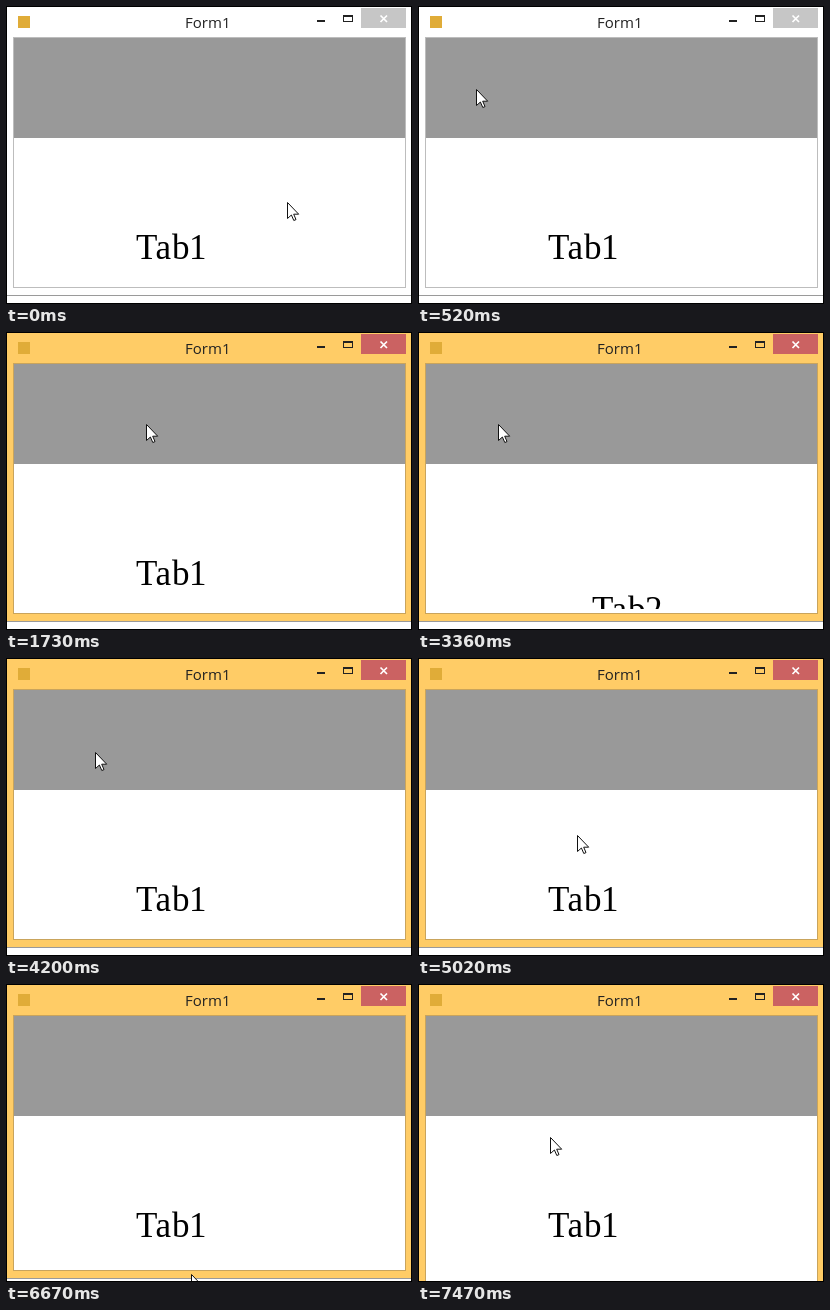
Write an HTML page that moves like this. It is 406x298 px and loops after 8 s.

```html
<!DOCTYPE html>
<html lang="en">
<head>
<meta charset="utf-8">
<title>Form1</title>
<style>
  html, body { margin: 0; width: 100%; height: 100%; overflow: hidden; background: #fff; }
  svg { display: block; width: 100vw; height: 100vh; }
  .crisp { shape-rendering: crispEdges; }
  .title { font: 15px "Open Sans", "Noto Sans", sans-serif; fill: #222; }
  .tab { font: 35px "Liberation Serif", "Noto Serif", serif; fill: #000; }
  #frame { fill: #fff; }
  #client { fill: #fff; stroke: #bdbdbd; }
  #close { fill: #c6c6c6; }
  .active #frame { fill: #ffcc66; }
  .active #client { stroke: #c9a45c; }
  .active #close { fill: #cb6262; }
</style>
</head>
<body>
<svg id="stage" viewBox="0 0 406 298">
  <defs>
    <clipPath id="labelArea"><rect x="8" y="132" width="391" height="145"/></clipPath>
  </defs>
  <rect width="406" height="298" fill="#fff"/>

  <g class="crisp">
    <rect id="frame" x="1" y="1" width="404" height="288"/>
    <rect id="edge" x="1" y="289" width="404" height="1" fill="#9a9a9a"/>
    <rect id="client" x="7.5" y="31.5" width="392" height="250"/>
    <rect x="8" y="32" width="391" height="100" fill="#999"/>
    <rect x="12" y="10" width="12" height="12" fill="#e0ac38"/>
    <rect x="311" y="14" width="8" height="2" fill="#222"/>
    <path d="M337 9h10v7h-10z M338 11v4h8v-4z" fill="#222" fill-rule="evenodd"/>
    <rect id="close" x="355" y="2" width="45" height="20"/>
  </g>
  <path d="M374.5 9.5l6.5 6.5m0-6.5l-6.5 6.5" stroke="#fff" stroke-width="1.7"/>
  <text class="title" x="179" y="22">Form1</text>

  <g clip-path="url(#labelArea)">
    <text id="tab1" class="tab" x="130 149.5 166 183" y="253">Tab1</text>
    <text id="tab2" class="tab" x="174 193.5 210 227" y="289">Tab2</text>
  </g>

  <path id="cursor" d="M.5 .5V16.5L4.4 13L6.8 18.5L9 17.6L6.7 12.2H11.7Z" fill="#fff" stroke="#111"/>
  <rect class="crisp" x=".5" y=".5" width="405" height="297" fill="none" stroke="#000"/>
</svg>
<script>
  const LOOP = 8000;
  const OFF = [-50, -50];

  // each step keeps the values it does not name
  const steps = [
    { at: 0, pos: [281, 196], active: false, tab: 1, grow: 0 },
    { at: 100, pos: [170, 152] },
    { at: 520, pos: [58, 83] },
    { at: 920, active: true },
    { at: 1310, pos: [112, 89] },
    { at: 1730, pos: [140, 92] },
    { at: 2150, tab: 2 },
    { at: 2570, pos: [125, 92] },
    { at: 3360, pos: [80, 92] },
    { at: 3780, pos: [70, 94], tab: 1 },
    { at: 4200, pos: [89, 94] },
    { at: 4620, pos: [157, 120] },
    { at: 5020, pos: [159, 177] },
    { at: 5410, pos: OFF },
    { at: 5830, pos: [184, 293] },
    { at: 6250, pos: [185, 285] },
    { at: 6670, pos: [185, 290], grow: 5 },
    { at: 7070, pos: OFF, grow: 30 },
    { at: 7470, pos: [132, 153] }
  ];
  for (let i = 1; i < steps.length; i++) steps[i] = { ...steps[i - 1], ...steps[i] };

  const el = id => document.getElementById(id);
  const set = (id, name, value) => el(id).setAttribute(name, value);

  function show({ pos, active, tab, grow }) {
    el("stage").classList.toggle("active", active);
    set("frame", "height", 288 + grow);
    set("edge", "y", 289 + grow);
    set("client", "height", 250 + grow);
    set("tab1", "visibility", tab === 1 ? "visible" : "hidden");
    set("tab2", "visibility", tab === 2 ? "visible" : "hidden");
    set("cursor", "transform", `translate(${pos})`);
  }

  const start = performance.now();
  let current;
  function tick() {
    const t = (performance.now() - start) % LOOP;
    const step = steps.findLast(s => s.at <= t);
    if (step !== current) show(current = step);
    requestAnimationFrame(tick);
  }
  tick();
</script>
</body>
</html>
```
